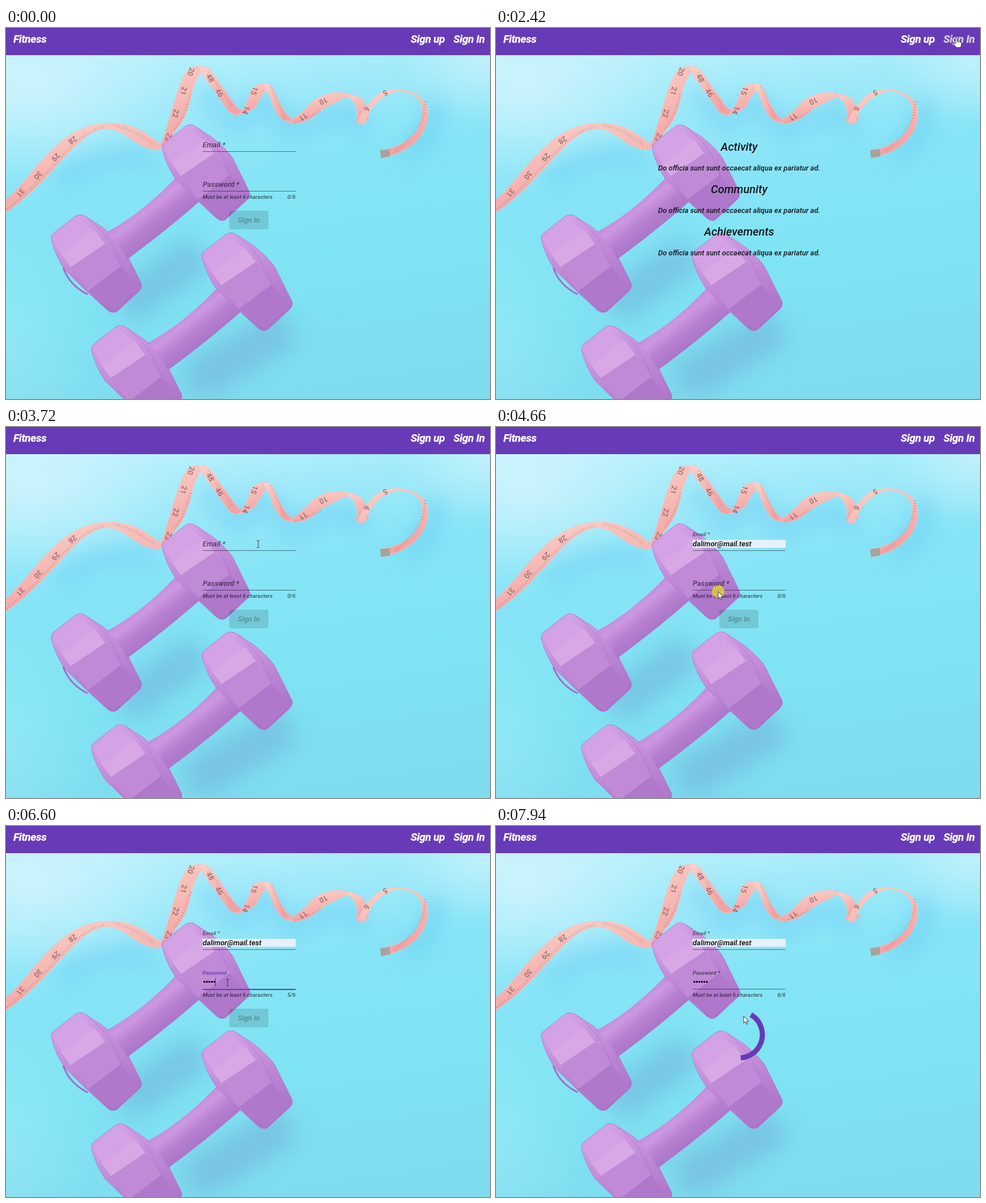
Write an HTML page that moves like this. It is 854 px wide and 656 px high and loops after 8 s.

```html
<!DOCTYPE html>
<html lang="en">
<head>
<meta charset="utf-8">
<title>Fitness sign in</title>
<style>
  html, body { margin: 0; width: 100%; height: 100%; overflow: hidden; }
  svg { display: block; width: 100vw; height: 100vh; }
  text { font: italic 500 13px Roboto, sans-serif; white-space: pre; }
  .nav text { font-size: 19px; font-weight: 700; letter-spacing: -.3px; stroke-width: .3; }
  .mark { fill: #7b4f55; opacity: .75; text-anchor: middle; font-style: normal; }
</style>
</head>
<body>
<svg viewBox="0 0 854 656" preserveAspectRatio="none">
  <defs>
    <linearGradient id="sky" x1=".35" y1="0" x2=".55" y2="1">
      <stop offset="0" stop-color="#c3f2fc"/>
      <stop offset=".2" stop-color="#a0eafa"/>
      <stop offset=".4" stop-color="#86e4f6"/>
      <stop offset=".65" stop-color="#7fe4f3"/>
      <stop offset="1" stop-color="#7fdcee"/>
    </linearGradient>
    <radialGradient id="glow">
      <stop offset="0" stop-color="#d2f4fd"/>
      <stop offset="1" stop-color="#d2f4fd" stop-opacity="0"/>
    </radialGradient>
    <linearGradient id="body" x1=".2" y1="0" x2=".7" y2="1">
      <stop offset="0" stop-color="#d6a5e7"/>
      <stop offset=".55" stop-color="#bd86d5"/>
      <stop offset="1" stop-color="#a872c8"/>
    </linearGradient>
    <linearGradient id="grip" x1=".3" y1=".3" x2=".7" y2=".75">
      <stop offset="0" stop-color="#b981d6"/>
      <stop offset=".3" stop-color="#cd98e2"/>
      <stop offset=".55" stop-color="#b67fcf"/>
      <stop offset="1" stop-color="#a36fc4"/>
    </linearGradient>
    <linearGradient id="tape" x1="0" y1="0" x2=".4" y2="1">
      <stop offset="0" stop-color="#fbd3c9"/>
      <stop offset="1" stop-color="#f3a2a3"/>
    </linearGradient>
    <filter id="soft" x="-50%" y="-50%" width="200%" height="200%"><feGaussianBlur stdDeviation="20"/></filter>
    <filter id="lift" x="-20%" y="-20%" width="140%" height="160%"><feDropShadow dx="0" dy="1.5" stdDeviation="1.5" flood-opacity=".35"/></filter>
    <g id="head">
      <path fill="url(#body)" stroke="#b06fce" stroke-width=".8" d="M346 406Q345 398 352 393L388 365Q397 359 408 366L437 385Q461 404 474 422L504 482Q508 490 500 498L462 533Q454 538 445 531L410 499 370 460Q353 435 346 406Z"/>
      <path fill="#d3a3e5" d="M348 404L391 366 422 391 364 433Z"/>
      <path fill="#d7a7e6" d="M364 433L422 389 441 414 380 455Z"/>
      <path fill="#c08ad7" d="M380 455L441 414 469 453 411 497Z"/>
      <path fill="#af78cb" d="M411 497L469 453 500 494 456 533Z"/>
      <path fill="none" stroke="#a169c8" opacity=".6" d="M408 368Q450 396 469 453"/>
    </g>
    <path id="handle" fill="url(#grip)" d="M176 362Q240 328 302 262L342 306Q288 354 214 409 199 378 176 362Z"/>
  </defs>

  <rect width="854" height="656" fill="url(#sky)"/>
  <ellipse cx="50" cy="110" rx="260" ry="150" fill="url(#glow)" opacity=".75"/>
  <ellipse cx="840" cy="60" rx="150" ry="110" fill="url(#glow)" opacity=".6"/>
  <ellipse cx="10" cy="560" rx="150" ry="220" fill="url(#glow)" opacity=".2"/>
  <g filter="url(#soft)" fill="none" stroke="#4fb9ee" stroke-width="26" opacity=".42">
    <path d="M90 275Q170 205 265 238M345 110L410 170 460 125 500 182 600 145 635 185M755 125Q765 185 700 225"/>
    <path d="M205 495L345 395M325 630L500 525" stroke="#6d9fd0" stroke-width="70"/>
  </g>

  <g fill="url(#tape)" stroke="#f6c4bd" stroke-width=".7">
    <path d="M0 303C50 262 90 170 180 168C225 168 244 184 273 205L272 216C225 215 215 178 175 178C122 184 85 268 0 326Z"/>
    <path d="M270 212C288 175 300 100 320 75Q330 66 352 68Q335 85 328 115 318 160 304 175L278 210Z"/>
    <path d="M340 70Q352 64 362 76L400 130Q410 147 421 146L414 153Q402 157 392 146L352 90Z"/>
    <path d="M410 153Q425 140 432 110 440 97 462 98L466 103Q452 115 440 140 425 152 410 153Z"/>
    <path d="M455 98Q468 97 474 112 484 140 500 158L512 163 500 167Q485 166 472 140 465 115 455 105Z"/>
    <path d="M495 166Q520 155 540 130 570 108 605 116L630 125Q605 116 585 130 560 140 545 155 520 174 495 166Z"/>
    <path d="M600 117Q625 118 634 135L640 160 628 171 617 165Q627 140 600 117Z"/>
    <path d="M620 166Q635 135 655 118 690 99 725 118 748 132 744 160 737 202 690 222L664 230 661 216Q703 210 724 183 737 160 734 138 725 112 690 112 660 118 640 150L632 170Z"/>
  </g>
  <path fill="#a8a29b" d="M660 216L677 214 678 227 662 230Z"/>
  <g fill="none" stroke="#8c5a60" stroke-width="5" stroke-dasharray=".8 4" opacity=".5">
    <path d="M2 321C85 257 118 184 175 175M190 172Q225 178 262 208M297 178Q315 160 326 115M357 78L400 140M468 104L492 158M510 167Q532 160 555 147M739 130Q742 175 685 220"/>
  </g>
  <g id="marks"></g>

  <use href="#head" x="-266" y="-32"/>
  <use href="#head" x="-195" y="164"/>
  <use href="#handle"/>
  <use href="#handle" x="72" y="196"/>
  <use href="#head" transform="translate(-60 -184) scale(.97 .98)"/>
  <use href="#head"/>
  <path fill="none" stroke="#a66bc6" stroke-width="3" d="M101 424Q112 455 144 471"/>

  <rect width="854" height="48" fill="#673ab7"/>
  <g id="scene"></g>
</svg>

<script>
const LOOP = 8000, PURPLE = '#673ab7', EMAIL = 'dalimor@mail.test';
const scene = document.getElementById('scene');
const clamp = v => Math.max(0, Math.min(1, v));
const smooth = v => { v = clamp(v); return v * v * (3 - 2 * v); };
const mix = (a, b, k) => a + (b - a) * k;
const text = (s, x, y, attrs = '') => `<text x="${x}" y="${y}" ${attrs}>${s}</text>`;

document.getElementById('marks').innerHTML = [
  ['31', 25, 291, 130], ['30', 56, 260, 130], ['29', 87, 228, 135], ['28', 117, 198, 145],
  ['20', 326, 77, 110], ['21', 313, 111, 105], ['22', 299, 151, 105], ['23', 286, 193, 115],
  ['48', 360, 89, 60], ['46', 376, 115, 60], ['15', 438, 111, 110], ['14', 423, 145, 110],
  ['11', 524, 157, 145], ['10', 560, 129, 155], ['6', 636, 143, 120], ['5', 669, 114, 155],
].map(([s, x, y, turn]) =>
  `<text class="mark" transform="translate(${x} ${y}) rotate(${turn})" y="4" style="font-size:13px">${s}</text>`).join('');

// Pointer path: time, x, y
const PATH = [
  [150, 660, 473], [930, 62, 13], [1629, 62, 13], [1630, 62, 27], [1870, 62, 27],
  [2420, 812, 17], [3130, 812, 17], [3720, 445, 207], [3950, 445, 207], [4200, 430, 232],
  [4370, 430, 232], [4500, 392, 291], [4900, 392, 291], [5300, 391, 277],
  [6760, 391, 277], [7080, 437, 336], [LOOP, 437, 336],
];
const CLICKS = [[1010, 1075], [2980, 3060], [3810, 3900], [4350, 4400], [4660, 4750], [7230, 7320]];
const KEYS = [5830, 6050, 6230, 6450, 6600, 6750];

function pointerAt(t) {
  const i = PATH.findIndex(p => p[0] > t);
  if (i < 1) return null;
  const [t0, x0, y0] = PATH[i - 1], [t1, x1, y1] = PATH[i], k = smooth((t - t0) / (t1 - t0));
  return { x: mix(x0, x1, k), y: mix(y0, y1, k) };
}

const SHAPES = {
  arrow: '<path d="M0 0V12.5L3 9.8 5 14.6 7 13.7 5 9.2H9Z" fill="#fff" stroke="#222" stroke-width=".9"/>',
  hand: '<path d="M-1.5 1Q0-1 1.5 1V6Q4 5 4.5 6.5 7 6 7.2 7.5 9.5 7 9.5 9V12Q9 15 7.5 17.5H0L-5 11Q-5.5 8.5-1.5 10.5Z" fill="#fff" stroke="#222" stroke-width=".9"/><path d="M1.5 6V9M4.5 7V9.5M7.2 8V10" stroke="#222" stroke-width=".7"/>',
  beam: '<path d="M-2.5-6H2.5M0-6V6M-2.5 6H2.5" fill="none" stroke="#333" stroke-width=".9"/>',
};

function pointer(t, p, onForm) {
  const overInput = onForm && p.x > 347 && p.x < 511 && (p.y > 199 && p.y < 216 || p.y > 268 && p.y < 284);
  const overLink = p.y < 24 && (p.x < 75 || p.x > 714);
  const clicking = CLICKS.some(([from, to]) => t >= from && t < to);
  return (clicking ? `<circle cx="${p.x}" cy="${p.y}" r="11" fill="#e3d22f" opacity=".8"/>` : '') +
    `<g transform="translate(${p.x} ${p.y})">${SHAPES[overLink ? 'hand' : overInput ? 'beam' : 'arrow']}</g>`;
}

function nav(p) {
  const link = (s, left, right) => {
    const color = p && p.y < 24 && p.x >= left && p.x <= right ? '#d3d3d3' : '#fff';
    return text(s, left, 26, `fill="${color}" stroke="${color}"`);
  };
  return `<g class="nav">${text('Fitness', 13, 26, 'fill="#fff" stroke="#fff"')}${link('Sign up', 714, 775)}${link('Sign In', 789.5, 846)}</g>`;
}

function home() {
  return ['Activity', 'Community', 'Achievements'].map((title, i) =>
    text(title, 429, 217 + 75.2 * i, 'text-anchor="middle" fill="#14161c" style="font-size:20px"') +
    text('Do officia sunt sunt occaecat aliqua ex pariatur ad.', 429, 252 + 75.2 * i, 'text-anchor="middle" fill="#14161c"')).join('');
}

function field(label, y, float, focused) {
  const star = focused ? '<tspan fill="#e6bf35">*</tspan>' : '*';
  return text(`${label} ${star}`, 347, y - 18.5 * float,
      `fill="${focused ? PURPLE : '#000'}" fill-opacity="${focused ? 1 : .6}" style="font-size:${mix(13, 9.75, float)}px"`) +
    `<rect x="347" y="${y + 7}" width="164" height="${focused ? 2 : 1}" fill="${focused ? PURPLE : 'rgba(0,0,0,.5)'}"/>`;
}

function button(enabled) {
  return `<rect x="394" y="323" width="69" height="33" rx="3.5" ${enabled ? `fill="${PURPLE}" filter="url(#lift)"` : 'fill-opacity=".12"'}/>` +
    text('Sign In', 428.5, 344, `text-anchor="middle" ${enabled ? 'fill="#fff"' : 'fill-opacity=".3"'}`);
}

// cubic-bezier(.35, 0, .25, 1)
function bezierEase(x) {
  let lo = 0, hi = 1, s = .5;
  for (let i = 0; i < 20; i++, s = (lo + hi) / 2) {
    const at = 1.05 * (1 - s) ** 2 * s + .75 * (1 - s) * s * s + s ** 3;
    if (at < x) lo = s; else hi = s;
  }
  return 3 * (1 - s) * s * s + s ** 3;
}

function spinner(age) {
  const length = 5 + 75 * bezierEase(clamp(age / 500));
  return `<circle cx="429" cy="369" r="41" fill="none" stroke="${PURPLE}" stroke-width="9" pathLength="100"
    stroke-dasharray="${length} 100" transform="rotate(${age * .18 - 90} 429 369)"/>`;
}

function dropdown(hover) {
  return `<rect x="346" y="217" width="176" height="85" rx="2" fill="#fff" filter="url(#lift)"/>` +
    (hover ? '<rect x="346" y="221" width="176" height="38" fill="#e8e8e9"/>' : '') +
    text(EMAIL, 358, 237, 'style="font-style:normal;font-weight:400;font-size:11px"') +
    text('••••••', 358, 251, 'fill="#777" style="font-size:9px"');
}

function signIn(t) {
  const active = t > 3050;
  const emailFocus = t >= 3810 && t < 4660, passFocus = t >= 4750 && t < 7230;
  const emailFloat = active ? smooth((t - 3810) / 250) : 0;
  const passFloat = active ? smooth((t - 4750) / 250) : 0;
  const typed = KEYS.filter(k => t >= k).length;
  const caretOn = passFocus && (typed || Math.floor((t - 4670) / 500) % 2 === 0);
  let out = '';
  if (t >= 4350) out += '<rect x="347" y="199.5" width="164" height="14" fill="#e8f0fe"/>' + text(EMAIL, 347, 211);
  out += field('Email', 211, emailFloat, emailFocus) + field('Password', 281, passFloat, passFocus);
  for (let i = 0; i < typed; i++) out += `<circle cx="${350 + 4.4 * i}" cy="275.5" r="1.7"/>`;
  if (caretOn) out += `<rect x="${347 + 4.4 * typed}" y="269" width="1" height="14" fill-opacity=".6"/>`;
  out += text('Must be at least 6 characters', 347, 302, 'fill-opacity=".62" style="font-size:9.75px"') +
    text(`${typed}/6`, 511, 302, 'text-anchor="end" fill-opacity=".62" style="font-size:9.75px"');
  out += t < 7772 ? button(typed === 6) : spinner(t - 7772);
  if (t >= 3950 && t < 4480) out += dropdown(t >= 4200);
  return out;
}

function draw(t) {
  const p = pointerAt(t), onForm = t < 1040 || t >= 3060;
  let out = nav(p) + (onForm ? signIn(t) : home());
  if (t >= 2570 && t < 3060) out += '<path d="M0 646H104Q107 646 107 649V656H0Z" fill="#dee1e6"/>';
  if (p) out += pointer(t, p, onForm);
  scene.innerHTML = out;
}

const start = performance.now();
function tick() {
  draw((performance.now() - start) % LOOP);
  requestAnimationFrame(tick);
}
tick();
</script>
</body>
</html>
```
